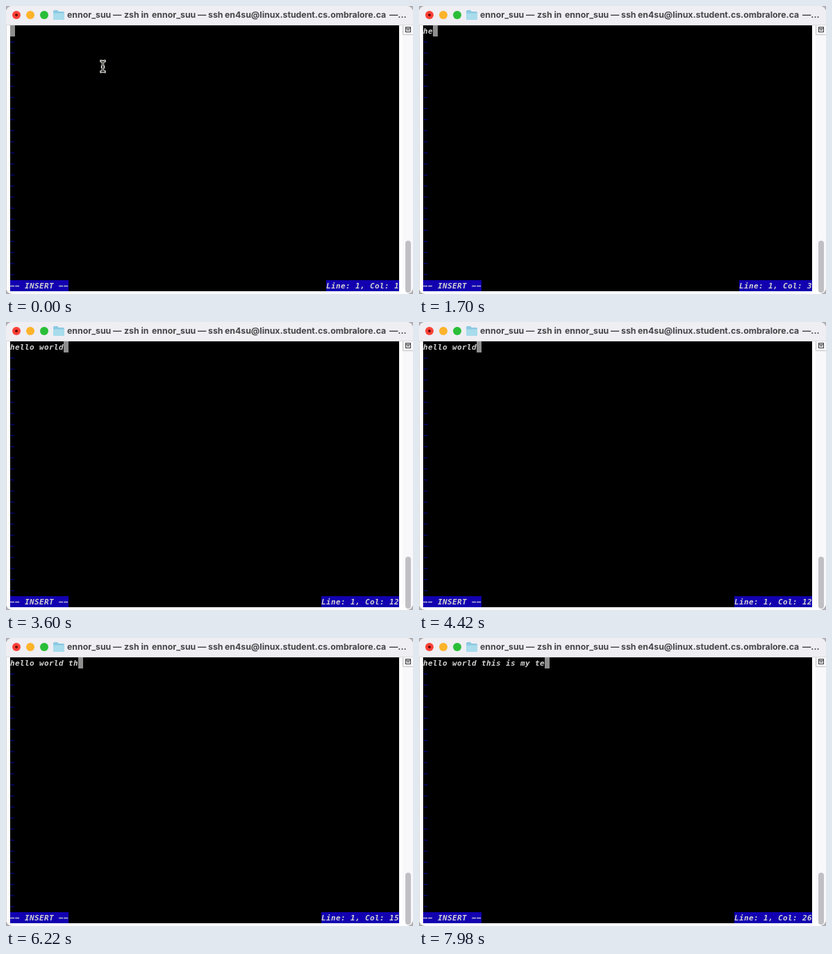
Recreate the animation shown at these times as an HTML page. Size 586 by 416 pixels, loop 8 s.

```html
<!DOCTYPE html>
<html lang="en">
<head>
<meta charset="utf-8">
<title>Terminal</title>
<style>
  html, body { margin: 0; width: 100%; height: 100%; overflow: hidden; background: #b0b0b4; }
  svg { display: block; width: 586px; height: 416px; }
  .bar { font: 700 12.3px Inter, "Open Sans", sans-serif; fill: #464648; }
  .term { font: italic 700 11px "DejaVu Sans Mono", monospace; letter-spacing: calc(7px - .602em); fill: #d2d2d2; white-space: pre; }
  .tilde { fill: #06008c; }
</style>
</head>
<body>
<svg viewBox="0 0 586 416" xmlns="http://www.w3.org/2000/svg">
  <!-- window -->
  <rect width="586" height="416" rx="9" fill="#fefefe"/>
  <path d="M0 27V9a9 9 0 0 1 9-9H577a9 9 0 0 1 9 9V27z" fill="#eeeef3"/>
  <rect y="27" width="586" height="1" fill="#dadade"/>
  <rect y="28" width="1" height="380" fill="#d8d8dc"/>

  <!-- title bar -->
  <circle cx="15" cy="13" r="6" fill="#fd4138"/>
  <circle cx="15" cy="13" r="2" fill="#6b0a04"/>
  <circle cx="35" cy="13" r="6" fill="#fdb32a"/>
  <circle cx="55" cy="13" r="6" fill="#2abe38"/>
  <path d="M68 8q0-2 2-2h4l2 2h6q2 0 2 2v8q0 2-2 2H70q-2 0-2-2z" fill="#8cc9e2"/>
  <path d="M68 10.500h16V18q0 2-2 2H70q-2 0-2-2z" fill="#a8dcec"/>
  <g class="bar">
    <text x="88" y="17">ennor_suu</text>
    <text x="154" y="17">—</text>
    <text x="170" y="17">zsh in</text>
    <text x="210" y="17">ennor_suu</text>
    <text x="276" y="17">—</text>
    <text x="291" y="17">ssh</text>
    <text x="315" y="17">en4su@linux.student.cs.ombralore.ca</text>
    <text x="552" y="17">—...</text>
  </g>

  <!-- scroll bar -->
  <rect x="571" y="28" width="15" height="380" fill="#f8f8fb"/>
  <path d="M571.500 28V41.500H586" fill="none" stroke="#c4c4c8"/>
  <rect x="575.500" y="30.500" width="7" height="7" fill="#e6e6ea" stroke="#3c3c3e"/>
  <path d="M576 32.500h6M577 34.500h4" stroke="#3c3c3e"/>
  <rect x="575" y="339" width="8" height="75" rx="4" fill="#c0c0c4"/>

  <!-- terminal -->
  <rect x="6" y="28" width="560" height="384"/>
  <g id="rows" class="term"></g>
  <rect x="6" y="396" width="84" height="16" fill="#1200b0"/>
  <text class="term" x="6" y="408">−− INSERT −−</text>
  <rect id="posBox" y="396" height="16" fill="#1200b0"/>
  <text id="pos" class="term" y="408"></text>
  <text id="line" class="term" x="6" y="40"></text>
  <rect id="caret" y="28" width="7" height="16" fill="#8e8e8e"/>

  <!-- mouse pointer -->
  <g id="mouse" fill="none" stroke-linecap="square">
    <path id="beam" d="M137 79.500q2.500 0 2.500 2V93q0 2-2.500 2M142 79.500q-2.500 0-2.500 2V93q0 2 2.500 2M138.500 88h2" stroke="#f4f4ec" stroke-width="3.400"/>
    <path d="M137 79.500q2.500 0 2.500 2V93q0 2-2.500 2M142 79.500q-2.500 0-2.500 2V93q0 2 2.500 2M138.500 88h2" stroke="#000" stroke-width="1.200"/>
  </g>
</svg>
<script>
const LOOP = 8000, CELL = 7, LEFT = 6, RIGHT = 566, HIDE_MOUSE = 1260;
const TYPED = "hello world this is my te";
// time of each key, in ms
const KEYS = [
  1340, 1640, 1940, 2220, 2480,
  2640, 2780, 2920, 3060, 3180, 3300,
  5400,
  6040, 6180, 6320, 6440, 6580, 6720, 6860,
  7040, 7220, 7400, 7600, 7780, 7960
];
const $ = id => document.getElementById(id);
const line = $("line"), caret = $("caret"), pos = $("pos"), posBox = $("posBox"), mouse = $("mouse");

for (let row = 1; row <= 22; row++) {
  const t = document.createElementNS("http://www.w3.org/2000/svg", "text");
  t.setAttribute("x", LEFT);
  t.setAttribute("y", 40 + row * 16);
  t.setAttribute("class", "tilde");
  t.textContent = "~";
  $("rows").append(t);
}

let shown = -1;
function show(n) {
  if (n === shown) return;
  shown = n;
  const label = `Line: 1, Col: ${n + 1}`;
  const width = label.length * CELL;
  line.textContent = TYPED.slice(0, n);
  caret.setAttribute("x", LEFT + n * CELL);
  pos.textContent = label;
  pos.setAttribute("x", RIGHT - width);
  posBox.setAttribute("x", RIGHT - width);
  posBox.setAttribute("width", width);
}

const start = performance.now();
function draw(now) {
  const t = Math.max(0, now - start) % LOOP;
  show(KEYS.filter(k => k <= t).length);
  mouse.style.visibility = t < HIDE_MOUSE ? "visible" : "hidden";
  requestAnimationFrame(draw);
}
draw(start);
</script>
</body>
</html>
```
